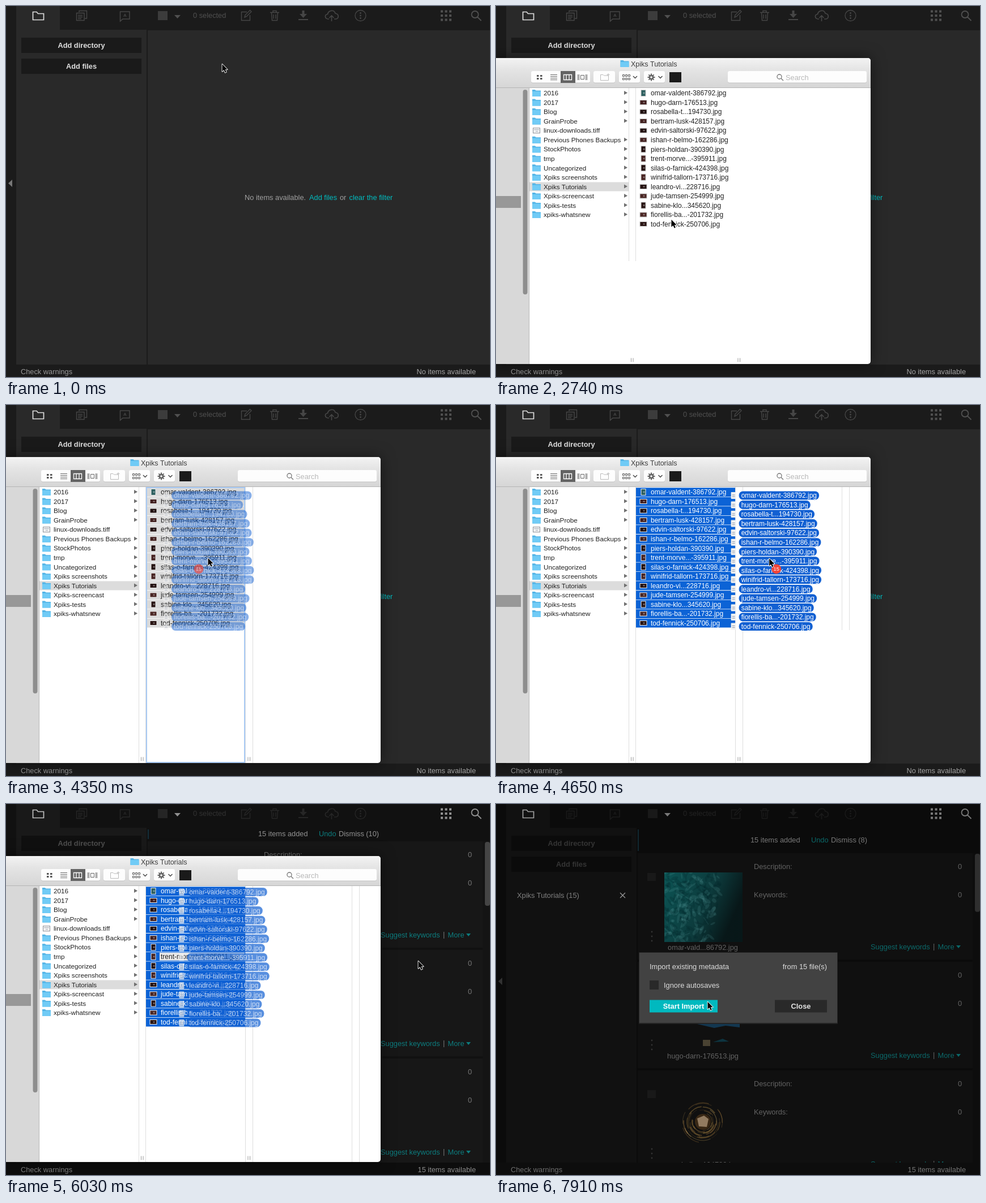
An HTML page with a canvas that plays this animation: 854 px wide and 656 px high, repeating every 7.99 s.

```html
<!DOCTYPE html>
<html lang="en">
<head>
<meta charset="utf-8">
<title>Importing files by drag and drop</title>
<style>
html, body { margin: 0; width: 100%; height: 100%; overflow: hidden; background: #1b1b1b; }
canvas { display: block; }
</style>
</head>
<body>
<canvas id="stage" width="854" height="656"></canvas>
<script>
const c = document.getElementById('stage').getContext('2d');
const LOOP = 7990, ROW = 16.54, TEAL = '#00bcc0', FONT = '"Liberation Sans", Arial, sans-serif';

// Moments of the story
const OPEN = 1700, CLICK = 2830, SELECT = 3310, GRAB = 4260, LEAVE = 4430,
  DROP = 5770, RETURNED = 6200, CLOSE = 6770;

// Cursor legs: first step, last step, number of steps, x and y reached
const legs = [[360, 360, 1, 378, 102], [510, 510, 1, 375, 102], [780, 1400, 8, -20, 122],
  [2000, 2390, 5, 332, 439], [2560, 2740, 3, 309, 377], [CLICK, SELECT, 6, 280, 144],
  [3390, 4170, 10, 308, 269], [GRAB, 4350, 2, 356, 270], [LEAVE, 5060, 8, 691, 272],
  [5140, 5230, 2, 746, 277], [DROP, 5880, 2, 727, 277], [7150, 7150, 1, 694, 278],
  [7300, 7910, 8, 373, 349]];
const dropBeats = [DROP, 5880, 6030, RETURNED, 6380];

const folders = ['2016', '2017', 'Blog', 'GrainProbe', 'linux-downloads.tiff',
  'Previous Phones Backups', 'StockPhotos', 'tmp', 'Uncategorized', 'Xpiks screenshots',
  'Xpiks Tutorials', 'Xpiks-screencast', 'Xpiks-tests', 'xpiks-whatsnew'];
const files = ['omar-valdent-386792', 'hugo-darn-176513', 'rosabella-t...194730',
  'bertram-lusk-428157', 'edvin-saltorski-97622', 'ishan-r-belmo-162286',
  'piers-holdan-390390', 'trent-morve...-395911', 'silas-o-farnick-424398',
  'winifrid-tallorn-173716', 'leandro-vi...228716', 'jude-tamsen-254999',
  'sabine-klo...345620', 'fiorellis-ba...-201732', 'tod-fennick-250706'].map(s => s + '.jpg');
const portraits = [0, 6, 7, 8, 9, 12];

const ramp = (t, a, b) => Math.min(1, Math.max(0, (t - a) / (b - a)));
const ease = f => f * f * (3 - 2 * f);

function random(seed) {
  return () => (seed = (seed * 16807) % 2147483647) / 2147483647;
}

function cursorAt(t) {
  let x = 381, y = 102;
  for (const [from, to, n, x2, y2] of legs) {
    if (t < from) break;
    const step = (to - from) / (n - 1) || 1;
    const f = Math.min(n, Math.floor((t - from) / step + .01) + 1) / n;
    x += (x2 - x) * f;
    y += (y2 - y) * f;
  }
  return [x, y];
}

function box(x, y, w, h, color, r = 0) {
  c.fillStyle = color;
  c.beginPath();
  c.roundRect(x, y, w, h, r);
  c.fill();
}
function fill(d, color) { c.fillStyle = color; c.fill(new Path2D(d)); }
function line(d, color, w = 1) { c.strokeStyle = color; c.lineWidth = w; c.stroke(new Path2D(d)); }
function disc(x, y, r, color) {
  c.fillStyle = color;
  c.beginPath();
  c.arc(x, y, r, 0, 7);
  c.fill();
}
// y is the middle of the capitals
function text(s, x, y, color, size = 12.8, align = 'left', weight = '') {
  c.font = `${weight} ${size}px ${FONT}`;
  c.textAlign = align;
  c.fillStyle = color;
  c.fillText(s, x, y + size * .36);
}
function layer(alpha, draw) {
  c.save();
  c.globalAlpha *= alpha;
  draw();
  c.restore();
}
function clipTo(x, y, w, h, r) {
  c.beginPath();
  c.roundRect(x, y, w, h, r);
  c.clip();
}

function toolbar(k) {
  line('M129 11V8.5H142.500V22H139M124.500 12.500H138V25.500H124.500ZM127 16.500H135M127 19.500H135M127 22.500H133', k, 1.4);
  line('M201.500 10H218V23H206L201.500 27Z', k, 1.5);
  text('A', 210, 16.500, k, 8, 'center', 'bold');
  box(268, 9, 17, 16, '#3c3c3c');
  text('0 selected', 330, 16.500, '#505050');
  line('M425 10.500H415.500V25.500H430.500V16M421 20L422 16L430.500 7.500L433 10L424.500 18.500Z', k, 1.4);
  line('M466 11.500H482M471 11V8.500H477V11M468.500 12L469.500 25.500H478.500L479.500 12M472 15V22.500M476 15V22.500', k, 1.4);
  fill('M522.500 8H526.500V14H531L524.500 21L518 14H522.500ZM516 23H533V25H516Z', k);
  line('M570 23H568C562 22 562 15 567.500 14.500C569 7 579 6 581 13C588 14 588 23 581 23H579M574.500 27V18M570.500 21L574.500 17L578.500 21', k, 1.7);
  line('M635 17a9.500 9.500 0 1 1 -19 0a9.500 9.500 0 1 1 19 0', k, 1.3);
  for (let i = -1; i < 2; i++) disc(625.5, 17 + i * 4.5, 1.4, k);
}

function brightIcons(k) {
  line('M47.500 10.500H54L56.500 13.500H66.500V24.500H47.500Z', '#dedede', 1.7);
  fill('M297 16H308L302.500 22Z', k);
  for (let i = 0; i < 9; i++) box(767 + i % 3 * 7.5, 7.5 + Math.floor(i / 3) * 7.5, 4, 4, k);
  line('M833.500 15a6 6 0 1 1 -12 0a6 6 0 1 1 12 0M832 19.500L838.500 26', k, 1.8);
}

function seaPhoto(x, y) {
  const rnd = random(11), g = c.createLinearGradient(x, y, x + 138, y + 60);
  g.addColorStop(0, '#0a7272');
  g.addColorStop(.6, '#0b4c4e');
  g.addColorStop(.95, '#041a1c');
  c.save();
  clipTo(x, y, 138, 123, 0);
  box(x, y, 138, 123, g);
  for (let i = 0; i < 260; i++) {
    const v = rnd() * 123, u = rnd() * (105 - v * .2);
    c.fillStyle = rnd() < .5 ? 'rgba(95,170,168,.22)' : 'rgba(0,35,38,.3)';
    c.beginPath();
    c.ellipse(x + u, y + v, 2 + rnd() * 7, 1 + rnd() * 2.5, rnd() * 3, 0, 7);
    c.fill();
  }
  c.restore();
}

function cityPhoto(y) {
  fill(`M355 ${y + 76}L372 ${y + 70}H430V${y + 82}L405 ${y + 79}L385 ${y + 83}Z`, '#14486c');
  fill(`M383 ${y + 108}L400 ${y + 102}L411 ${y + 107}Z`, '#0d4555');
  box(365, y + 104, 13, 11, '#625740');
}

function lightPhoto(x, y) {
  const rnd = random(5);
  for (let i = 0; i < 45; i++) {
    const a = rnd() * 7, r = 15 + 23 * rnd();
    c.strokeStyle = `hsla(${32 + rnd() * 10}, 45%, ${25 + rnd() * 35}%, .6)`;
    c.lineWidth = .6 + rnd() * 1.2;
    c.beginPath();
    c.arc(x, y, r, a, a + .4 + rnd() * 1.2);
    c.stroke();
  }
  disc(x, y, 14, '#4b3318');
  fill(`M${x - 10} ${y - 6}L${x + 2} ${y - 11}L${x + 10} ${y - 5}L${x + 7} ${y + 9}L${x - 7} ${y + 8}Z`, '#b89e80');
}

function items(t, p) {
  const bar = 42 * p, top = 45 + bar, ink = '#868686', link = '#0a8e90';
  const labels = ['omar-vald...86792.jpg', files[1], 'rosabella...194730.jpg'];
  const rows = draw => { for (let i = 0; i < 3; i++) draw(top + i * 192, i); };

  box(250, 42, 604, 592, '#1b1b1b');
  rows(y => {
    box(250, y, 591, 188, '#262626');
    box(267, y + 35, 15, 14, '#3c3c3c');
  });
  box(841, top, 13, 592, '#202020');
  box(845, top + 1, 9, 123 - bar * .48, '#707070', 4);
  layer(.58 * p ** .6, () => box(0, 0, 854, 656, '#000'));

  layer(1 - .3 * p, () => {
    rows((y, i) => {
      [() => seaPhoto(297, y + 34), () => cityPhoto(y + 34), () => lightPhoto(365, y + 91)][i]();
      text(labels[i], 365, y + 166, ink, 12.8, 'center');
      for (let d = 0; d < 3; d++) disc(275, y + 139 + d * 8, 1.4, '#444');
      ['Description:', 'Keywords:'].forEach((s, j) => {
        text(s, 455, y + 23 + j * 50, ink);
        text('0', 815, y + 23 + j * 50, ink);
      });
      text('Suggest keywords', 661, y + 165, link);
      text('|', 771, y + 164, ink);
      text('More', 779.5, y + 165, link);
      fill(`M812 ${y + 163}h8l-4 5z`, link);
    });
    if (p < .2) return;
    const left = 10 - (t >= CLOSE) - (t >= 7560), x = left > 9 ? 445 : 449, y = 42 + bar / 2;
    box(250, 45, 2, bar - 4, '#143442');
    text('15 items added', x, y, '#a8a8a8');
    text('Undo', x + 107, y, link);
    text(`Dismiss (${left})`, x + 142, y, '#a8a8a8');
  });
}

function modal() {
  box(252, 262, 351, 127, '#252525', 1);
  box(253, 263, 349, 124, '#424242');
  text('Import existing metadata', 271, 287, '#dcdcdc');
  text('from 15 file(s)', 584, 287, '#dcdcdc', 12.8, 'right');
  box(271, 312, 16, 16, '#292929');
  text('Ignore autosaves', 296, 320, '#dcdcdc');
  box(271, 346.5, 120, 22, '#00b9bf');
  text('Start Import', 331, 357, '#fff', 12.8, 'center', 'bold');
  box(492, 346.5, 92, 22, '#292929');
  text('Close', 538, 357, '#e4e4e4', 12.8, 'center', 'bold');
}

function app(t) {
  const loaded = t >= DROP;
  const beat = dropBeats.filter(b => b <= t).pop() || 0;
  const p = ease(ramp(beat, DROP, DROP + 520));

  box(0, 0, 854, 656, '#1b1b1b');
  box(18, 0, 77, 43, '#292929');
  box(18, 42, 230, 592, '#292929');
  box(250, 43, 604, 591, '#292929');
  fill('M4 313.500L11 307V320Z', '#777');
  ['directory', 'files'].forEach((s, i) => {
    box(27, 56 + i * 37, 212, 27, '#1a1a1a');
    text('Add ' + s, 133, 69 + i * 37, loaded ? '#7c7c7c' : '#dedede', 12.8, 'center', 'bold');
  });
  toolbar(loaded ? '#3e3e3e' : '#464646');
  if (loaded) {
    c.save();
    clipTo(0, 0, 854, 634, 0);
    items(t, p);
    c.restore();
    box(0, 634, 854, 22, '#0d0d0d');
    text('Xpiks Tutorials (15)', 37, 161, '#808080');
    line('M219 157L228 166M228 157L219 166', '#999', 1.3);
    modal();
  } else {
    text('No items available.', 421, 338, '#a0a0a0');
    text('Add files', 535, 338, TEAL);
    text('or', 589, 338, '#a0a0a0');
    text('clear the filter', 605.5, 338, TEAL);
  }
  layer(1 - .3 * p, () => {
    brightIcons(loaded ? '#a8a8a8' : '#505050');
    text('Check warnings', 26, 646, '#999');
    text((loaded ? '15' : 'No') + ' items available', 829, 646, '#a4a4a4', 12.8, 'right');
  });
}

function folder(x, y) {
  fill(`M${x} ${y}h5l1.500 1.500h8.500v10.500h-15z`, '#53b4e6');
  box(x, y + 3, 15, 9, '#70cbf6', 1);
}

function finderBar() {
  const g = c.createLinearGradient(0, 92, 0, 144);
  g.addColorStop(0, '#f3f3f3');
  g.addColorStop(.4, '#e4e4e4');
  g.addColorStop(1, '#d6d6d6');
  box(0, 92, 661, 52, g);
  box(0, 144, 661, 1, '#b5b5b5');
  folder(219.5, 96);
  text('Xpiks Tutorials', 238, 102, '#3c3c3c', 12.5);
  for (const [x, w] of [[62, 104], [172, 38], [217, 37], [261, 37], [409, 245]]) {
    box(x, 115.5, w, 21, '#c2c2c2', 3);
    box(x, 115, w, 20.5, '#fdfdfd', 3);
  }
  box(114, 115, 26, 21, '#636363');
  for (let i = 0; i < 4; i++) {
    box(72 + i % 2 * 6, 122 + (i >> 1) * 5, 3.5, 3, '#555');
    box(96, 121 + i * 3, 12, 1, '#666');
  }
  line('M119.500 121.500H133.500V130.500H119.500ZM124 121V131M129 121V131', '#fff', 1.3);
  line('M144.500 121V131M146.500 121V131M149.500 122.500H155.500V129.500H149.500ZM158.500 121V131M160.500 121V131', '#666');
  line('M184.500 121.500H189L190.500 123H198.500V131.500H184.500ZM198 119V124M195.500 121.500H200.500', '#bbb');
  for (let i = 0; i < 6; i++) line(`M${223.5 + i % 3 * 5} ${121.5 + (i > 2) * 6}h3v3h-3z`, '#555');
  for (const x of [242, 286.5]) line(`M${x} 124l3.500 3.500l3.500 -3.500`, '#444', 1.4);
  for (let a = 0; a < 8; a++) {
    const u = Math.cos(a * Math.PI / 4), v = Math.sin(a * Math.PI / 4);
    line(`M274 126L${274 + u * 6.5} ${126 + v * 6.5}`, '#666', 2);
  }
  disc(274, 126, 4.5, '#666');
  disc(274, 126, 1.8, '#fff');
  box(306, 117, 21, 18, '#1a1a1a');
  line('M504 125a4 4 0 1 1 -8 0a4 4 0 1 1 8 0M503 128L507 132', '#777', 1.3);
  text('Search', 511, 126, '#b8b8b8');
}

function folderRow(name, i) {
  const y = 154 + i * ROW;
  if (name === 'Xpiks Tutorials') box(59, y - 8, 175, 16, '#dcdcdc');
  if (name.endsWith('.tiff')) {
    box(65, y - 5, 13, 10, '#8a8f98');
    box(66, y - 4, 11, 8, '#f4f4f4');
    line(`M67 ${y - 1.5}h9M70 ${y + 1.5}h4`, '#a0a8b4');
  } else {
    folder(64, y - 6);
    fill(`M226 ${y - 4}L232 ${y - .5}L226 ${y + 3}Z`, '#707070');
  }
  text(name, 84, y, '#222', 11.7);
}

function fileRow(name, i, on, hovering, renaming) {
  const y = 154 + i * ROW, rnd = random(i * 977 + 31);
  if (on) box(247, y - 7.8, 175, ROW - .8, hovering ? '#dadada' : '#0c63d6');
  const [w, h] = portraits.includes(i) ? [9, 12] : [13, 9];
  box(260 - w / 2, y - h / 2, w, h, on ? '#eee' : '#c8c8c8');
  box(261 - w / 2, y - h / 2 + 1, w - 2, h - 2, `hsl(${i ? rnd() * 40 : 180}, 35%, ${i ? 7 + rnd() * 20 : 28}%)`);
  disc(261, y, 1.4, 'rgba(255,255,255,.4)');
  if (renaming) {
    box(271, y - 7, 150, 14, '#e9e9e9');
    text('trent-morvehill-395911.jpg', 273, y, '#222', 12);
  } else text(name, 273, y, on && !hovering ? '#fff' : '#222', 12);
}

function finder(t) {
  c.save();
  c.shadowColor = 'rgba(0,0,0,.5)';
  c.shadowBlur = 26;
  box(-10, 92, 671, 541, '#fff', 5);
  c.restore();
  c.save();
  clipTo(-10, 92, 671, 541, 5);
  finderBar();

  box(0, 145, 58, 488, '#d8d8d8');
  box(58, 145, 1, 488, '#b9b9b9');
  box(0, 336, 44, 21, '#989898');
  box(47.5, 148, 8, 362, '#8e8e8e', 4);

  const divider = (x, bottom) => box(x, 145, 1, bottom - 145, '#dedede');
  const bottom = t < GRAB ? 451 : 633;
  for (const x of [234, 246]) divider(x, bottom);
  if (t >= CLICK) for (const x of [422, 435]) divider(x, bottom);
  if (t >= LEAVE) for (const x of [610, 623]) divider(x, t < DROP ? 398 : 633);
  for (const x of [238.5, 427]) line(`M${x} 622.500v7M${x + 3.5} 622.500v7`, '#999');

  const hovering = t >= GRAB && t < LEAVE;
  folders.forEach(folderRow);
  files.forEach((name, i) => {
    const on = t >= SELECT || t >= CLICK && i === files.length - 1;
    fileRow(name, i, on, hovering, i === 7 && t >= 5880);
  });
  if (hovering) line('M248 146H421V632H248Z', '#a8caf4', 2);
  c.restore();
}

function drag(t) {
  const cx = cursorAt(t)[0], picking = t < LEAVE, back = t >= DROP;
  const beat = dropBeats.filter(b => b <= t).pop();
  const dx = back ? 424 * Math.exp((DROP - beat) / 122) : picking ? (cx - 308) * .48 : cx - 322;
  const dy = back ? dx * .03 : 6;
  layer(picking ? .5 : back ? .7 : 1, () => files.forEach((name, i) => {
    const x = 273 + dx, y = 154 + dy + i * ROW;
    box(x - 18, y - 6, 9, 12, '#f2f2f2', 1);
    line(`M${x - 16} ${y - 1}h5M${x - 16} ${y + 2}h5`, '#8794a8');
    c.font = `12px ${FONT}`;
    box(x - 4, y - 7.5, c.measureText(name).width + 8, 15, '#1260d2', 7);
    text(name, x, y, '#fff', 12);
  }));
  if (back) return;
  const x = 273 + dx + (picking ? 44 : 62), y = 284 + dy;
  layer(picking ? .65 : 1, () => {
    disc(x, y, 8.5, '#f04438');
    text('15', x, y, '#fff', 9, 'center');
  });
  if (cx > 661) {
    disc(x - 2.5, y + 1.5, 9.5, '#fff');
    disc(x - 2.5, y + 1.5, 8.5, '#2faa2c');
    line(`M${x - 7.5} ${y + 1.5}h10M${x - 2.5} ${y - 3.5}v10`, '#fff', 2.2);
  }
}

function cursor(t) {
  const arrow = 'M0 0V13L3 10.300L5.200 15L7.300 14L5.200 9.500H9.200Z', [x, y] = cursorAt(t);
  c.save();
  c.translate(x + .5, y + .8);
  c.lineJoin = 'round';
  line(arrow, '#fff', 1.8);
  fill(arrow, '#000');
  c.restore();
}

function frame(t) {
  app(t);
  const shown = Math.min(ramp(t, OPEN, OPEN + 90), 1 - ramp(t, CLOSE, CLOSE + 200));
  if (shown > 0) layer(shown, () => finder(t));
  if (t >= GRAB && t < RETURNED) drag(t);
  cursor(t);
}

const start = performance.now();
(function tick() {
  frame((performance.now() - start) % LOOP);
  requestAnimationFrame(tick);
})();
</script>
</body>
</html>
```
